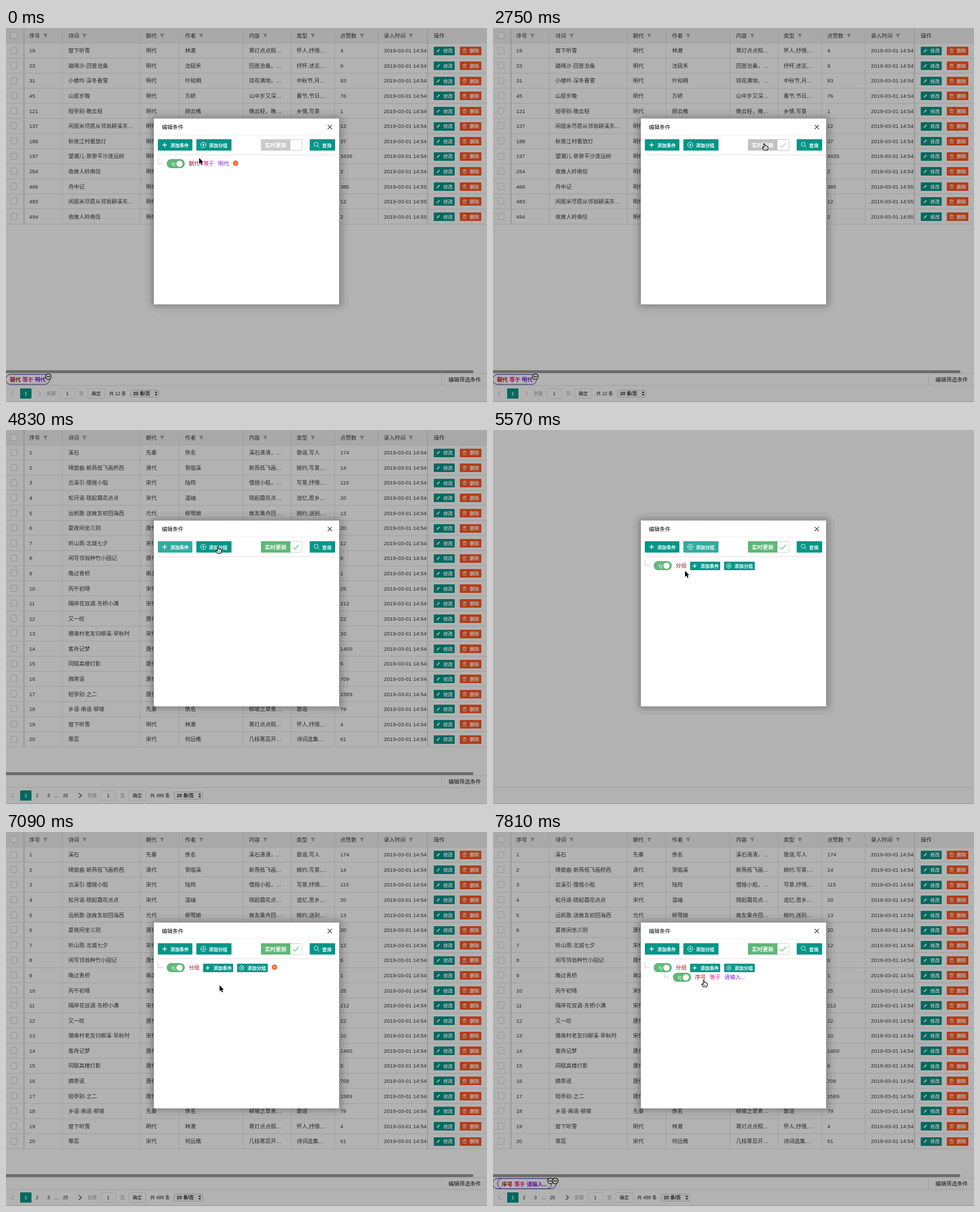
An HTML page with a canvas that plays this animation: 849 px wide and 659 px high, repeating every 8000 ms.

```html
<!DOCTYPE html>
<html lang="zh-CN">
<head>
<meta charset="utf-8">
<style>
html, body { margin: 0; width: 100%; height: 100%; overflow: hidden; background: #b2b2b2; }
canvas { display: block; width: 849px; height: 659px; }
</style>
</head>
<body>
<canvas id="stage" width="849" height="659"></canvas>
<script>
const ctx = document.getElementById('stage').getContext('2d');
const W = 849, H = 659, LOOP = 8000, PITCH = 26.58;
const TEAL = '#009688', LIT = '#33aba0', GREEN = '#5fb878', RED = '#ff5722';
const FIELD = '#b01020', OP = '#f0088c', VALUE = '#7a18e0', INK = '#383838', PILL = '#30248c';
const FACE = '"Liberation Sans", "Noto Sans CJK SC", "Noto Sans CJK", sans-serif';
const BODY = 9.55, SMALL = 8.2;

// id | title | dynasty | author | content | type | likes
const FILTERED = `19|窗下听雪|明代|林澈|寒灯点点照…|怀人,抒情,…|4
23|踏晴沙·回首沧桑|明代|沈砚禾|回首沧桑，…|抒怀,述志,…|9
31|小楼吟·深冬看雪|明代|叶知桐|琼花满地，…|中秋节,月…|83
45|山居岁晚|明代|方峤|山中岁又深…|春节,节日,…|76
121|短亭别·晚云轻|明代|顾云樵|晚云轻，晚…|乡情,写景|1
137|闲居米尽愿从邻翁耕溪东…|明代||||12
188|秋夜江村看放灯|明代||||37
197|望潮儿·渺渺平沙连远树|明代||||3435
254|收故人岭南信|明代||||2
466|舟中记|明代||||385
483|闲居米尽愿从邻翁耕溪东…|明代||||12
494|收故人岭南信|明代||||2`;
const ALL = `1|溪石|先秦|佚名|溪石清清，…|歌谣,写人|174
2|晴窗曲·新燕低飞画桥西|清代|贺临溪|新燕低飞画…|婉约,写景,…|14
3|云溪引·慢摇小船|宋代|陆筠|慢摇小船，…|写景,抒情,…|115
4|松月谣·晓起霜花点点|宋代|温岫|晓起霜花点…|追忆,思乡,…|20
5|远帆歌·送故友初回海西|元代|柳莺娘|故友乘舟回…|婉约,送别,…|13
6|夏夜闲坐三则|唐代||||20
7|听山雨·北城七夕|宋代||||12
8|闲写邻翁种竹小园记|唐代||||6
9|晚过青桥|南北朝||||1
10|丙午初晴|宋代||||25
11|隔岸花双调·东桥小满|宋代||||212
12|又一叹|唐代||||22
13|赠南村老友归柳溪·早秋时|宋代||||10
14|客舟记梦|唐代||||1400
15|同赋高楼灯影|唐代||||6
16|摘茶谣|唐代||||709
17|短亭别·之二|唐代||||1589
18|乡谣·南谣·柳坡|先秦|佚名|柳坡之草青…|歌谣|79
19|窗下听雪|明代|林澈|寒灯点点照…|怀人,抒情,…|4
20|寒蕊|宋代|何远樵|几枝寒蕊开…|诗词选集…|61`;
const COLS = [41, 110, 247, 316, 429, 513, 590, 667, 755];
const HEADS = '序号|诗词|朝代|作者|内容|类型|点赞数|录入时间|操作'.split('|');
const EDGES = [99.5, 237, 305.5, 418.5, 503.5, 580, 657];

// time, pointer x, y, shape (a = arrow, h = hand), highlighted buttons
const STEPS = [
  [0, 341, 229, 'a', ''], [170, 338, 233, 'a', ''], [360, 333, 236, 'h', ''], [560, 332, 236, 'h', ''],
  [1070, 330, 236, 'h', ''], [1220, 326, 237, 'h', ''], [1370, 322, 236, 'h', ''], [1510, 324, 236, 'h', ''],
  [1660, 328, 236, 'h', ''], [1800, 334, 236, 'h', ''], [1950, 338, 235, 'a', ''],
  [2400, 402, 234, 'h', ''], [2570, 440, 216, 'a', ''], [2750, 479, 204, 'h', ''],
  [3110, 479, 204, 'h', ''], [3290, 444, 206, 'a', ''], [3460, 385, 206, 'h', 'g'], [3640, 333, 206, 'a', 'g'],
  [3820, 338, 206, 'h', 'g'], [4030, 340, 206, 'h', 'g'], [4270, 312, 205, 'h', 'c'],
  [4620, 326, 205, 'h', 'c'], [4830, 374, 206, 'h', 'c'], [5040, 374, 206, 'h', 'g'], [5210, 374, 206, 'h', 'g'],
  [5390, 358, 226, 'a', 'g'], [5570, 339, 248, 'a', 'g'], [5750, 346, 257, 'a', ''], [5930, 360, 268, 'a', ''],
  [6220, 374, 272, 'a', ''], [6640, 376, 268, 'a', ''], [6870, 377, 269, 'a', ''], [7090, 377, 270, 'a', ''],
  [7330, 375, 238, 'h', 's'], [7540, 377, 264, 'a', ''], [7810, 372, 261.5, 'h', '']
];

function rect(x, y, w, h, color) { ctx.fillStyle = color; ctx.fillRect(x, y, w, h); }

function round(x, y, w, h, r, fill, stroke, width = 1) {
  ctx.beginPath();
  ctx.roundRect(x, y, w, h, r);
  if (fill) { ctx.fillStyle = fill; ctx.fill(); }
  if (stroke) { ctx.strokeStyle = stroke; ctx.lineWidth = width; ctx.stroke(); }
}

function text(s, x, y, color = INK, size = BODY, weight = 400, align = 'left') {
  ctx.font = `${weight} ${size}px ${FACE}`;
  ctx.textAlign = align;
  ctx.fillStyle = color;
  ctx.fillText(s, x, y + size * 0.37);
}

function path(points, color, width, close, fill) {
  ctx.beginPath();
  points.forEach(([x, y], i) => i ? ctx.lineTo(x, y) : ctx.moveTo(x, y));
  if (close) ctx.closePath();
  if (fill) { ctx.fillStyle = fill; ctx.fill(); }
  if (color) { ctx.strokeStyle = color; ctx.lineWidth = width; ctx.stroke(); }
}

function at(x, y, draw) { ctx.save(); ctx.translate(x, y); draw(); ctx.restore(); }

function disc(x, y, r, fill, stroke, width) { round(x - r, y - r, 2 * r, 2 * r, r, fill, stroke, width); }

function plus(x, y, r, color = '#fff', width = 1.3) {
  path([[x - r, y], [x + r, y]], color, width);
  path([[x, y - r], [x, y + r]], color, width);
}

function cross(x, y, r, color, width) {
  path([[x - r, y - r], [x + r, y + r]], color, width);
  path([[x + r, y - r], [x - r, y + r]], color, width);
}

function rowButtons(y) {
  const top = Math.round(y - 7.5);
  round(755, top, 37, 15, 1, TEAL);
  path([[760, y + 3], [760.6, y + 1], [764.6, y - 3], [766, y - 1.6], [762, y + 2.4]], null, 0, true, '#fff');
  text('修改', 772, y + .3, '#fff', SMALL, 700);
  round(801, top, 38, 15, 1, RED);
  path([[806, y - 2], [813, y - 2]], '#fff', .8);
  path([[808, y - 3.4], [811, y - 3.4]], '#fff', .8);
  ctx.strokeStyle = '#fff';
  ctx.lineWidth = .7;
  ctx.strokeRect(807, y - 1.5, 5, 4.8);
  path([[809.5, y - .5], [809.5, y + 2.5]], '#fff', .7);
  text('删除', 818.5, y + .3, '#fff', SMALL, 700);
}

function checkbox(y) { round(8.5, Math.round(y) - 5.5, 11, 11, 1, '#fff', '#d2d2d2'); }

function table(source) {
  const rows = source.split('\n'), bottom = 26.5 + rows.length * PITCH;
  rect(0, 0, W, 26.5, '#f2f2f2');
  for (let i = 0; i <= rows.length; i++) rect(0, 26 + i * PITCH, W, 1, '#e2e2e2');
  EDGES.forEach(x => rect(x - .5, 0, 1, bottom, '#e2e2e2'));
  rect(30.5, 0, 2.5, bottom, '#dedede');
  rect(742.8, 0, 2, bottom, '#dcdcdc');
  checkbox(13);
  HEADS.forEach((head, i) => {
    text(head, COLS[i], 13);
    if (i < 8) at(COLS[i] + BODY * head.length + 9.5, 13, () =>
      path([[-4, -2.8], [4, -2.8], [1.2, .6], [1.2, 3.8], [-1.2, 2.8], [-1.2, .6]], null, 0, true, '#a2a2a2'));
  });
  rows.forEach((row, i) => {
    const y = 39.8 + i * PITCH;
    checkbox(y - .3);
    row.split('|').forEach((cell, k) => text(cell, COLS[k], y));
    ctx.save();
    ctx.beginPath();
    ctx.rect(660, y - 9, 83.5, 18);
    ctx.clip();
    text('2019-03-01 14:5' + (source === FILTERED && i > 8 ? 5 : 4) + ':', COLS[7], y);
    ctx.restore();
    rowButtons(y + .3);
  });
}

function chevron(x, dir, color) {
  path([[x - dir * 2.3, 640], [x + dir * 2.3, 644], [x - dir * 2.3, 648]], color, 1.1);
}

function pager(all) {
  const y = 644, dx = all ? 72.5 : 0, tail = all ? 77 : 0;
  chevron(11.5, -1, '#ccc');
  round(25, 635, 20, 18, 1, TEAL);
  text('1', 35, y, '#fff', SMALL, 700, 'center');
  if (all) [['2', 55], ['3', 75], ['…', 89], ['25', 105]].forEach(([s, x]) => text(s, x, y, '#222', SMALL, 400, 'center'));
  chevron(all ? 131 : 59, 1, all ? '#333' : '#ccc');
  text('到第', 71.5 + dx, y, '#999', SMALL);
  round(95 + dx, 635.5, 26.5, 17, 1, '#fff', '#e2e2e2');
  text('1', 108 + dx, y, '#222', SMALL, 400, 'center');
  text('页', 129 + dx, y, '#999', SMALL);
  round(144 + dx, 635.5, 30.5, 17, 1, '#fff', '#e2e2e2');
  text('确定', 151 + dx, y, '#222', SMALL, 500);
  text(`共 ${all ? 499 : 12} 条`, 182 + dx, y, '#222', SMALL, 500);
  round(219.5 + tail, 637.5, 50.5, 13, 3, '#f8f8f8', '#d0d0d0');
  text('20 条/页', 224.5 + tail, y, '#222', SMALL, 700);
  at(265 + tail, y, () => {
    path([[-2.2, -1], [0, -4], [2.2, -1]], null, 0, true, '#222');
    path([[-2.2, 1], [0, 4], [2.2, 1]], null, 0, true, '#222');
  });
}

function minus(x, y) {
  disc(x, y, 5, '#fff', '#111', 1.2);
  path([[x - 3, y], [x + 3, y]], '#111', 1.3);
}

function tag(words, x, y) {
  [FIELD, OP, VALUE].forEach((color, i) => text(words[i], x + i * 22, y, color, BODY, 700));
}

function footer(all, tagged) {
  round(-4, 603, 829, 5, 2.5, '#999');
  rect(0, 608.5, W, 1, '#e2e2e2');
  rect(768, 609, 1, 21, '#e2e2e2');
  text('编辑筛选条件', 781, 619, '#222');
  if (!all) {
    round(-.5, 610.5, 77.5, 17.5, 8.5, null, PILL);
    tag(['朝代', '等于', '明代'], 7, 619.5);
    minus(74.8, 614.3);
  } else if (tagged) {
    round(-.5, 610.5, 112, 18, 8.5, null, PILL);
    round(8, 610.5, 95.5, 18, 8.5, null, PILL);
    tag(['序号', '等于', '请输入...'], 15.5, 620);
    minus(101.5, 614.8);
    minus(110, 614.8);
  }
  pager(all);
}

function button(label, x, y, w, h, lit, icon, labelX) {
  round(x, y, w, h, 1, lit ? LIT : TEAL);
  icon();
  text(label, labelX, y + h / 2 + .5, '#fff', SMALL, 700);
}

function addButtons(x, y, h, gap, w, pad, litCond, litGroup) {
  const mid = y + h / 2;
  button('添加条件', x, y, w, h, litCond, () => plus(x + pad, mid, h > 16 ? 4 : 3.5), x + pad + 10);
  const gx = x + gap;
  button('添加分组', gx, y, w + 1, h, litGroup, () => {
    const r = h > 16 ? 4.7 : 4;
    disc(gx + pad + .3, mid, r, null, '#fff', .9);
    plus(gx + pad + .3, mid, r - 2, '#fff', .9);
  }, gx + pad + 10);
}

function toggle(on, hover) {
  const color = on ? GREEN : hover ? '#c2c2c2' : '#cacaca';
  round(450.5, 196.5, 72, 19, 1, '#fff', on ? '#d2d2d2' : color);
  rect(450, 196, 52, 20, color);
  text('实时更新', 457, 206, '#fff', BODY, 700);
  if (on || hover) path([[506.5, 206.5], [510, 210], [517, 202.5]], color, 1.2);
}

function branch(x, y) {
  ctx.save();
  ctx.setLineDash([1.4, 1.6]);
  path([[x, y - 9], [x, y], [x + 9.5, y]], '#888', 1);
  ctx.restore();
  round(x + 15.3, y - 8, 32, 16, 8, GREEN);
  text('与', x + 23, y + .8, '#fff', SMALL);
  disc(x + 38, y + .2, 5.5, '#fff');
}

function condition(words, x, y) {
  branch(x, y);
  [FIELD, OP, VALUE].forEach((color, i) => text(words[i], x + 54.2 + i * 26, y - .4, color));
}

function remove(x) {
  disc(x, 238.2, 4.6, RED);
  cross(x, 238.2, 1.8, '#fff', 1);
}

function dialog(t, lit) {
  round(247, 145, 357, 357, 22, 'rgba(0,0,0,.035)');
  round(254, 152, 343.5, 342.5, 14, 'rgba(0,0,0,.05)');
  ctx.save();
  ctx.shadowColor = 'rgba(0,0,0,.3)';
  ctx.shadowBlur = 9;
  rect(261, 159.5, 327, 327.5, '#fff');
  ctx.restore();
  rect(261, 188, 327, 1, '#eee');
  text('编辑条件', 275, 174, '#111');
  cross(571.6, 174.4, 3.8, '#444', 1.3);
  addButtons(268, 196, 20, 68, 61, 12, lit === 'c', lit === 'g');
  toggle(t >= 3110, t >= 2750);
  button('查询', 536, 196, 45, 20, false, () => {
    disc(547.5, 204.8, 3.6, null, '#fff', .9);
    path([[550, 207.5], [553, 210.5]], '#fff', 1);
  }, 558);
  rect(268, 222.7, 313, 1, '#ddd');

  if (t < 2570) {
    condition(['朝代', '等于', '明代'], 268.3, 239);
    if (t < 360 || t >= 1800) remove(405.3);
  }
  if (t >= 5210) {
    branch(268.3, 239);
    text('分组', 322.5, 238.7, FIELD);
    addButtons(348, 232, 15, 60, 53, 8, lit === 's', false);
    if (t >= 6220 && t < 7330) remove(474);
  }
  if (t >= 7330) condition(['序号', '等于', '请输入...'], 302.4, 256);
}

function pointer(x, y, kind) {
  at(x, y, () => {
    ctx.lineJoin = 'round';
    if (kind === 'a') {
      const arrow = [[0, 0], [0, 10.8], [2.4, 8.6], [4.2, 12.6], [6, 11.8], [4.3, 8], [7.4, 7.8]];
      path(arrow, '#fff', 1.4, true);
      path(arrow, null, 0, true, '#000');
    } else {
      path([[-1, .4], [0, -.4], [1, .4], [1.4, 4], [3.2, 3.8], [4.8, 4.6], [6.2, 5.2], [6.4, 8], [5.2, 11.5],
        [-.6, 11.5], [-3.6, 7.2], [-3.2, 6], [-.6, 7]], '#000', 1.1, true, '#fff');
      [1.2, 3.2].forEach(k => path([[k, 7.6], [k, 10]], '#000', .7));
    }
  });
}

function page(t) {
  rect(0, 0, W, H, '#fff');
  const loading = t >= 3290 && t < 4030 || t >= 5210 && t < 5930 || t >= 7330 && t < 7540;
  if (!loading) {
    const all = t >= 4030;
    table(all ? ALL : FILTERED);
    footer(all, t >= 7540);
  }
  rect(0, 629.5, W, 1, '#e2e2e2');
  rect(0, 658, W, 1, '#d8d8d8');
  rect(0, 0, W, H, 'rgba(0,0,0,.3)');
}

let shown = null;
function tick(now) {
  const time = now % LOOP;
  const step = STEPS.findLast(s => s[0] <= time);
  if (step !== shown) {
    const [t, x, y, kind, lit] = shown = step;
    page(t);
    dialog(t, lit);
    pointer(x, y, kind);
  }
  requestAnimationFrame(tick);
}
tick(0);
</script>
</body>
</html>
```
